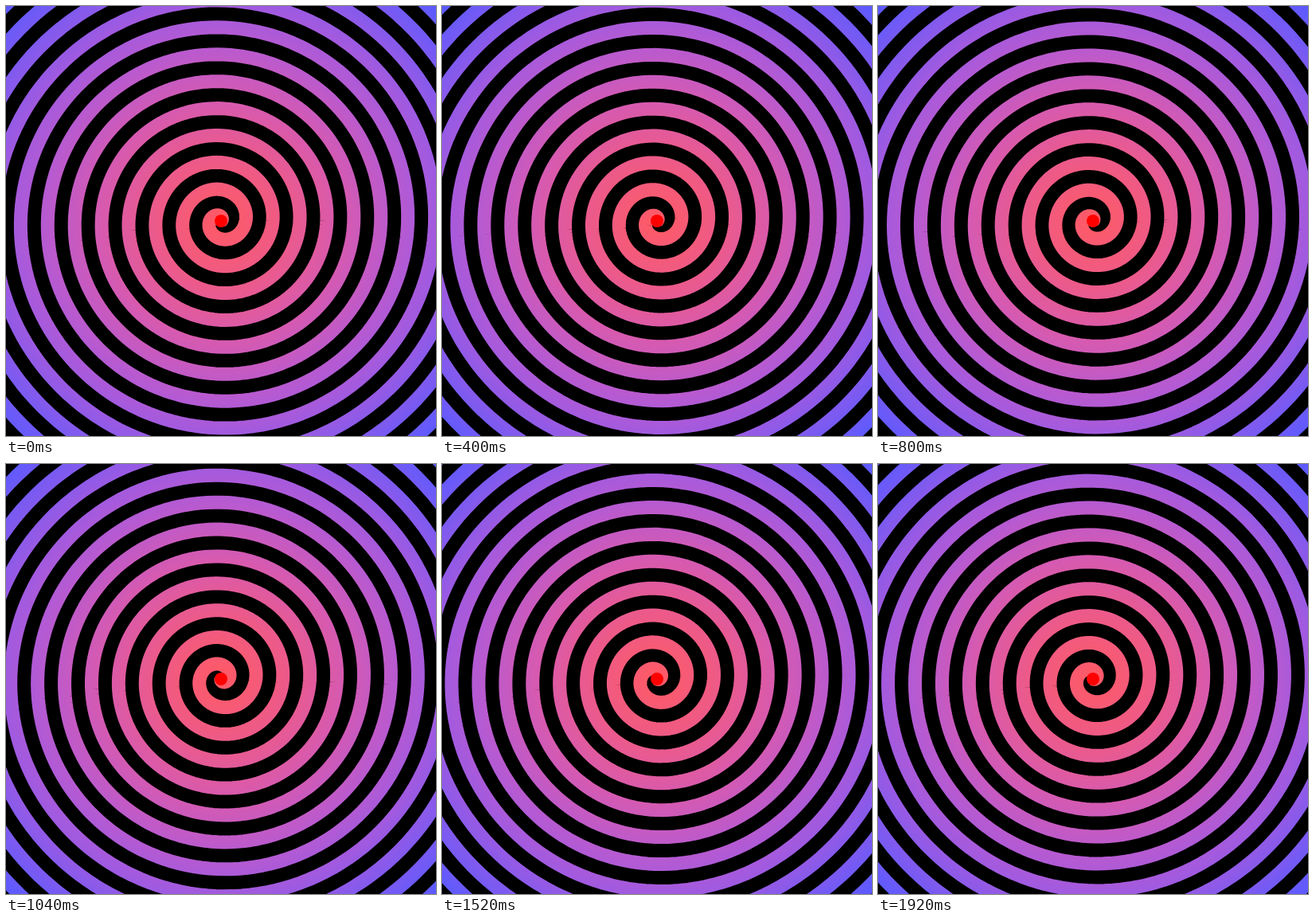
Animation of 540 by 540 pixels, one loop 2000 ms. Source, as an HTML page:

```html
<!DOCTYPE html>
<html lang="en">
<head>
<meta charset="utf-8">
<title>Spiral</title>
<style>
  html, body { margin: 0; width: 100%; height: 100%; overflow: hidden; background: #000; }
  svg { display: block; width: 100vw; height: 100vh; }
</style>
</head>
<body>
<svg viewBox="-270 -270 540 540">
  <defs>
    <radialGradient id="tint" gradientUnits="userSpaceOnUse" cx="0" cy="0" r="380">
      <stop offset="0" stop-color="#ff5a64"/>
      <stop offset=".22" stop-color="#ec5a8a"/>
      <stop offset=".4" stop-color="#d65ab0"/>
      <stop offset=".58" stop-color="#b85ad0"/>
      <stop offset=".72" stop-color="#a05ae0"/>
      <stop offset="1" stop-color="#5c5aff"/>
    </radialGradient>
  </defs>
  <rect x="-270" y="-270" width="540" height="540"/>
  <path id="spiral" fill="none" stroke="url(#tint)" stroke-width="17" stroke-linejoin="round"/>
  <circle r="8" fill="#f00"/>
</svg>
<script>
  const LOOP = 2000, HOLD = 80;
  const POSES = 60, TURNS = 5;
  const GROWTH = 5.4; // radius gained per radian
  const REACH = 400;
  const spiral = document.getElementById('spiral');

  function spiralPath() {
    const points = [];
    for (let a = 0; a * GROWTH < REACH; a += 0.04) {
      const r = a * GROWTH;
      points.push((r * Math.cos(a)).toFixed(2) + ' ' + (-r * Math.sin(a)).toFixed(2));
    }
    return 'M' + points.join('L');
  }

  function render(time) {
    // Poses advance at 30 per second but are only shown every HOLD ms.
    const tick = Math.floor((time % LOOP) / HOLD);
    const pose = Math.floor(tick * HOLD * POSES / LOOP);
    const angle = (pose + 1) * TURNS * 360 / (POSES - 1);
    spiral.setAttribute('transform', `rotate(${-angle})`);
  }

  spiral.setAttribute('d', spiralPath());
  const start = performance.now();
  function loop() {
    render(performance.now() - start);
    requestAnimationFrame(loop);
  }
  loop();
</script>
</body>
</html>
```
